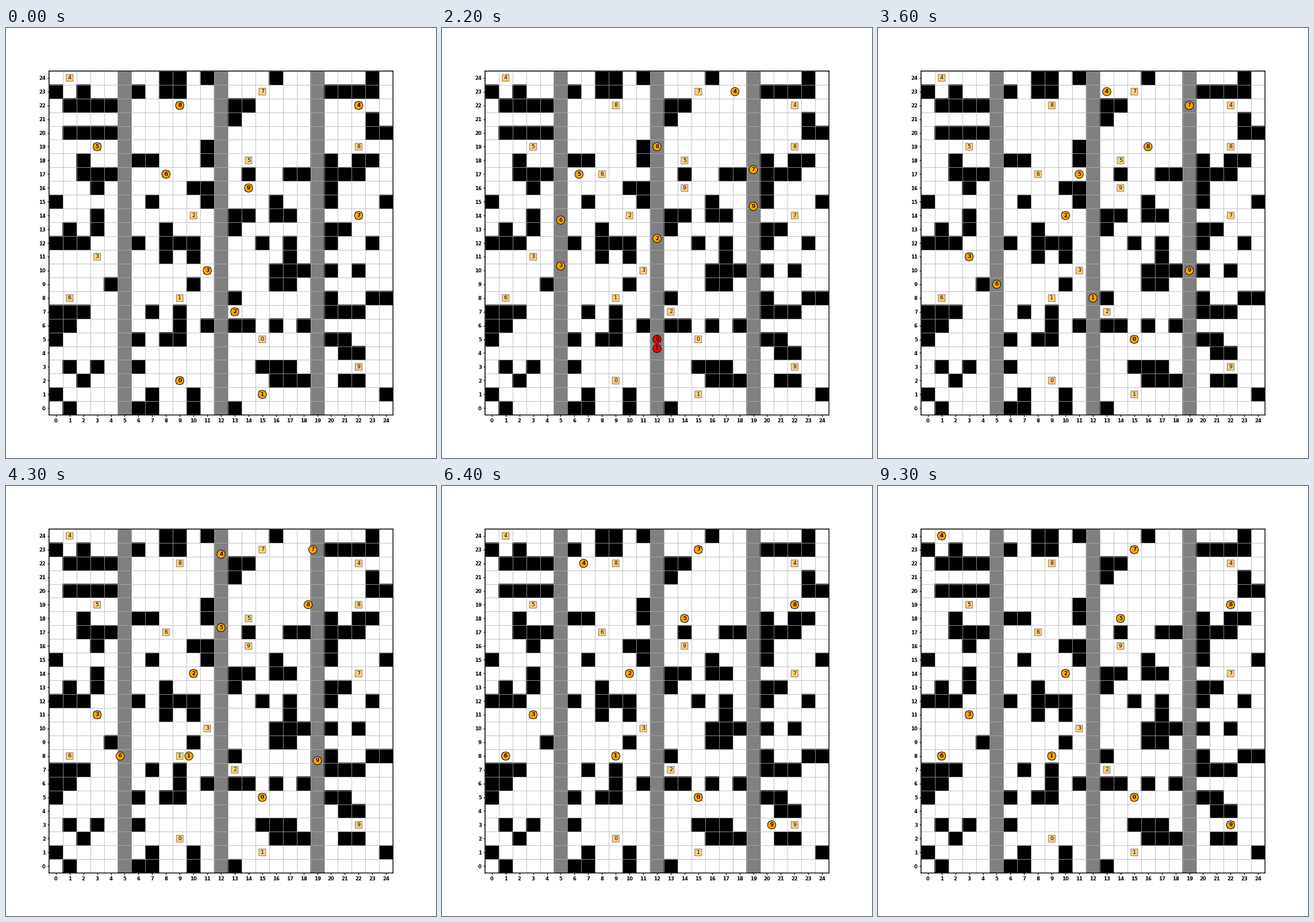
Animation of 748x748 px, one loop 9.6 s. Source, as a matplotlib script:

```python
from itertools import combinations

import matplotlib.pyplot as plt
import numpy as np
from matplotlib.animation import FuncAnimation
from matplotlib.patches import Circle, Rectangle

SIZE, DPI = 748, 68
CELLS = 25
FRAMES, INTERVAL = 96, 100
FRAMES_PER_STEP = 3
CRASH_DIST = 0.7
LANES = (5, 12, 19)

# Blocked columns of each row, top row first
WALLS = """8-9 11 16 23 / 0 2 6 8-9 20-23 / 1-4 13-14 / 13 23 / 1-4 23-24
/ 11 / 2 6-7 11 20 22-23 / 2-4 14 17-18 20-22 / 3 10-11 20 / 0 7 11 16 20 24
/ 3 13-14 16-17 / 1 3 8 13 20-21 / 0-2 6 8-10 15 17 20 23 / 8 10 17
/ 16-18 20 22 / 4 10 16-17 / 13 20 23-24 / 0-2 7 9 20-22
/ 0-1 9 11 13-14 16 18 / 0 6 8-9 20-21 / 21-22 / 1 3 6 15-17
/ 2 16-18 21-22 / 0 7 10 24 / 1 6-7 10 13"""

# Start and goal of each robot
TRIPS = [
    ((9, 2), (15, 5)), ((15, 1), (9, 8)), ((13, 7), (10, 14)),
    ((11, 10), (3, 11)), ((22, 22), (1, 24)), ((3, 19), (14, 18)),
    ((8, 17), (1, 8)), ((22, 14), (15, 23)), ((9, 22), (22, 19)),
    ((14, 16), (22, 3)),
]
# Rows used between lanes by robots that do not take their goal row at once
DETOURS = {4: (23, 22), 5: (17,)}


def plan(start, goal, detour=()):
    """Corners: change row only in the lanes between start and goal."""
    (x, y), (gx, gy) = start, goal
    lanes = sorted((c for c in LANES if min(x, gx) < c < max(x, gx)),
                   reverse=gx < x)
    corners = [start]
    for i, lane in enumerate(lanes):
        corners.append((lane, y))
        y = detour[i] if i < len(detour) else gy
        corners.append((lane, y))
    return corners + [goal]


def walk(corners):
    """Cell at every step; a turn takes one extra step."""
    cells = [np.array(corners[0])]
    heading = None
    for corner in corners[1:]:
        gap = np.array(corner) - cells[-1]
        if not gap.any():
            continue
        move = np.sign(gap)
        if heading is not None and (move != heading).any():
            cells.append(cells[-1])
        heading = move
        for _ in range(abs(gap).max()):
            cells.append(cells[-1] + move)
    return np.array(cells)


def position(cells, step):
    t = np.arange(len(cells))
    return np.array([np.interp(step, t, axis) for axis in cells.T])


def add_block(x, y, w, h, color):
    ax.add_patch(Rectangle((x - 0.5, y - 0.5), w, h, fc=color, ec=color,
                           snap=False))


def add_digit(x, y, n):
    return ax.text(x, y, str(n), ha="center", va="center", fontsize=10, zorder=4)


fig = plt.figure(figsize=(SIZE / DPI, SIZE / DPI), dpi=DPI, facecolor="white")
ax = fig.add_axes([0.1, 0.1, 0.8, 0.8])
low, high = -0.5, CELLS - 0.5
ax.set(xlim=(low, high), ylim=(low, high),
       xticks=range(CELLS), yticks=range(CELLS))
ax.tick_params(width=1.4, labelsize=9, pad=2.8)
for label in ax.get_xticklabels() + ax.get_yticklabels():
    label.set_fontweight("bold")
for spine in ax.spines.values():
    spine.set(linewidth=1.5, snap=False)

edges = np.arange(CELLS + 1) - 0.5
for draw_lines in (ax.vlines, ax.hlines):
    draw_lines(edges, low, high, color="#b0b0b0", linewidth=0.8, zorder=1.5)

for lane in LANES:
    add_block(lane, 0, 1, CELLS, "gray")
for i, row in enumerate(WALLS.split("/")):
    for run in row.split():
        first, _, last = run.partition("-")
        width = int(last or first) - int(first) + 1
        add_block(int(first), CELLS - 1 - i, width, 1, "black")

for n, trip in enumerate(TRIPS):
    for x, y in trip:
        ax.add_patch(Rectangle((x - 0.25, y - 0.25), 0.5, 0.5, fc="orange",
                               ec="black", alpha=0.5, zorder=2, snap=False))
        add_digit(x, y, n)

paths = [walk(plan(*trip, DETOURS.get(n, ()))) for n, trip in enumerate(TRIPS)]
robots = [ax.add_patch(Circle(start, 0.3, fc="orange", ec="black", zorder=3))
          for start, _ in TRIPS]
# Each robot's digit is laid down twice to make it darker
digits = [[add_digit(*start, n) for _ in range(2)]
          for n, (start, _) in enumerate(TRIPS)]


def update(frame):
    spots = [position(p, frame / FRAMES_PER_STEP) for p in paths]
    for robot, pair, spot in zip(robots, digits, spots):
        robot.center = spot
        robot.set_facecolor("orange")
        for digit in pair:
            digit.set_position(spot)
    for a, b in combinations(range(len(robots)), 2):
        if np.hypot(*(spots[a] - spots[b])) < CRASH_DIST:
            robots[a].set_facecolor("red")
            robots[b].set_facecolor("red")
    return robots


anim = FuncAnimation(fig, update, frames=FRAMES, interval=INTERVAL,
                     init_func=lambda: update(0), repeat=True, repeat_delay=0)
plt.show()
```
